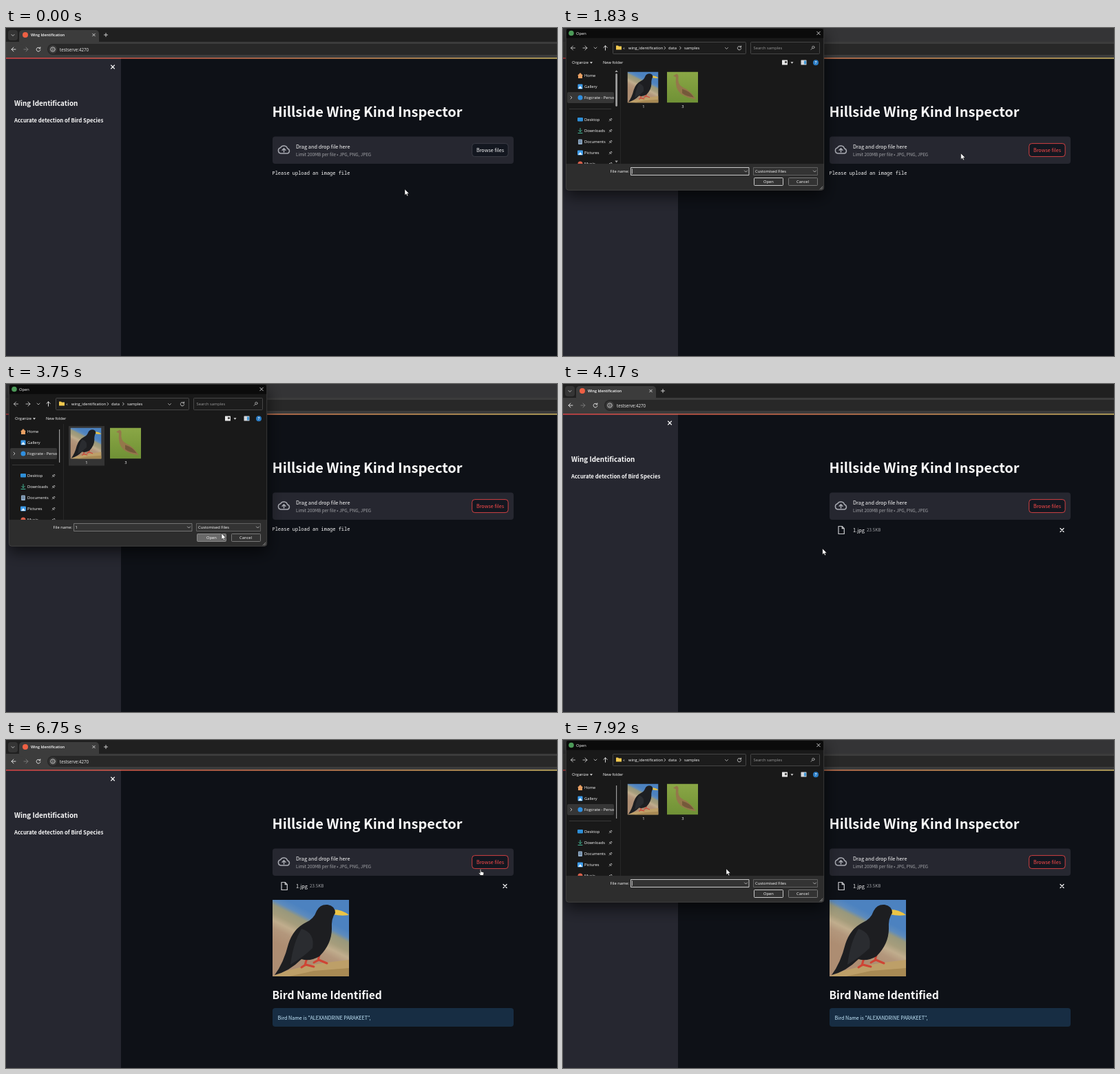
Write an HTML page with a canvas that moves like this. It is 800 px wide and 476 px high and loops after 8 s.

```html
<!DOCTYPE html>
<html lang="en">
<head>
<meta charset="utf-8">
<title>Wing Identification</title>
<style>
html, body { margin: 0; width: 100%; height: 100%; overflow: hidden; background: #0e1117; }
canvas { display: block; width: 800px; height: 476px; }
</style>
</head>
<body>
<canvas id="stage" width="800" height="476"></canvas>
<script>
const ctx = document.getElementById('stage').getContext('2d');
const LOOP = 8000;
const PAGE = '"Noto Sans CJK JP", "Noto Sans CJK SC", "Noto Sans CJK", Lato, sans-serif';
const UI = '"Open Sans", "Noto Sans", sans-serif';
const MONO = '"Noto Sans Mono", monospace';
const RED = '#ff4b4b', WHITE = '#fafafa';

// Dialog and page events, in ms
const OPEN = 1800, PICK = 2660, CLOSE = 3860, FILE = 4040, PHOTO = 4200, RESULT = 6240, REOPEN = 7800;

// Cursor path: time, x, y of the tip
const PATH = [
  [0, 579, 234], [80, 579, 234], [670, 703, 175], [1120, 703, 175], [1670, 621, 187],
  [1920, 560, 180], [2340, 140, 110], [2420, 137, 108], [2830, 137, 108], [3540, 312, 216],
  [3750, 313, 217], [3920, 313, 217], [4600, 520, 288], [5080, 533, 294], [6200, 533, 294],
  [6670, 689, 187], [7050, 689, 187], [7750, 255, 187], [7920, 237, 187], [8000, 237, 187]
];

function rect(x, y, w, h, fill, r = 0, stroke, lw = 1) {
  ctx.beginPath();
  ctx.roundRect(x, y, w, h, r);
  if (fill) { ctx.fillStyle = fill; ctx.fill(); }
  if (stroke) { ctx.strokeStyle = stroke; ctx.lineWidth = lw; ctx.stroke(); }
}

function disc(x, y, r, fill) {
  ctx.beginPath();
  ctx.arc(x, y, r, 0, 7);
  ctx.fillStyle = fill;
  ctx.fill();
}

// An SVG path placed at x, y
function shape(d, x, y, fill, stroke, lw = 1) {
  ctx.save();
  ctx.translate(x, y);
  const p = new Path2D(d);
  if (fill) { ctx.fillStyle = fill; ctx.fill(p); }
  if (stroke) {
    ctx.strokeStyle = stroke;
    ctx.lineWidth = lw;
    ctx.lineJoin = ctx.lineCap = 'round';
    ctx.stroke(p);
  }
  ctx.restore();
}

const line = (d, x, y, color, lw) => shape(d, x, y, null, color, lw);

// Stops are [offset, color] pairs
function gradient(x0, y0, x1, y1, stops) {
  const g = ctx.createLinearGradient(x0, y0, x1, y1);
  stops.forEach(([offset, color]) => g.addColorStop(offset, color));
  return g;
}

// y is the middle of the capitals
function text(str, x, y, size, color = WHITE, weight = 400, font = PAGE, align = 'left') {
  ctx.font = `${weight} ${size}px ${font}`;
  ctx.fillStyle = color;
  ctx.textAlign = align;
  ctx.fillText(str, x, y + size * 0.365);
}

const label = (str, x, y, color = '#fff', align) => text(str, x, y, 5.75, color, 400, UI, align);
const cross = (x, y, r, color, lw) => line(`M${-r} ${-r}L${r} ${r}M${r} ${-r}L${-r} ${r}`, x, y, color, lw);
const chevron = (x, y, color = '#ccc') => line('M-2-1L0 1L2-1', x, y, color, 0.8);

function clipped(x, y, w, h, draw) {
  ctx.save();
  ctx.beginPath();
  ctx.rect(x, y, w, h);
  ctx.clip();
  draw();
  ctx.restore();
}

function blackBird(x, y, size) {
  clipped(x, y, size, size, () => {
    ctx.translate(x, y);
    ctx.scale(size / 111, size / 111);
    rect(0, 0, 111, 111, gradient(4, -8, -24, 48, [
      [0, '#4c82c0'], [0.14, '#5d8bbd'], [0.24, '#98987c'], [0.42, '#a69d7c'],
      [0.56, '#c0ad8d'], [0.72, '#b3977c'], [1, '#ad8d72']
    ]));
    shape('M0 111L20 103L48 96L78 91L111 87V111Z', 0, 0, '#bd9f68');
    shape('M24 111L60 103L111 99V111Z', 0, 0, '#a88a54');
    shape('M88 14Q101 14 111 22Q99 24 88 21Z', 0, 0, '#ecc445');
    line('M50 84L47 95M42 98L48 94L60 97M68 80L66 88M60 91L67 87L79 92', 0, 0, '#cf4434', 3);
    shape('M64 16Q69 6 80 7Q91 9 91 19Q85 27 86 42Q86 64 68 82Q54 90 42 86Q24 104 3 109Q16 92 23 64Q30 42 48 33Q60 28 64 16Z', 0, 0, '#1d1e21');
    shape('M42 42Q62 48 58 70Q46 82 26 94Q30 62 42 42Z', 0, 0, '#2a2c30');
  });
}

function brownBird(x, y) {
  clipped(x, y, 45, 45, () => {
    rect(x, y, 45, 45, gradient(x, y, x, y + 45, [[0, '#8aa746'], [0.5, '#7d9c3d'], [1, '#6f9136']]));
    shape('M9 6L14 3Q17 4 16.5 8Q15 18 22 22Q34 27 42 40Q28 38 20 32Q11 24 13 8Z', x, y, '#94774a');
    shape('M22 25Q33 28 39 37Q28 36 22 31Z', x, y, '#75593a');
  });
}

function browserBar(active) {
  rect(0, 0, 800, 43, '#3c3c3c');
  rect(0, 0, 800, 20, active ? '#202020' : '#343436');
  rect(3, 3, 14, 15, active ? '#353535' : '#3e3e40', 4);
  chevron(10, 10.5, '#ddd');
  rect(19, 3, 116, 22, '#3c3c3c', 5);
  disc(28, 10, 4, '#ee6044');
  text('Wing Identification', 36, 10.3, 5.4, '#fff', 600, UI);
  cross(127.5, 10, 1.8, '#ddd', 0.9);
  line('M-2.5 0H2.5M0-2.5V2.5', 145, 10, '#ddd', 0.9);
  line('M3 0H-3M0-3L-3 0L0 3', 11, 31, '#ddd', 1);
  line('M-3 0H3M0-3L3 0L0 3', 29, 31, '#777', 1);
  line('M2.4-1.6A2.9 2.9 0 1 0 2.9 0.8M2.8-3.2V-1.2H.8', 47, 31, '#ddd', 1);
  rect(60, 23, 760, 16, '#282828', 8);
  disc(68, 31, 6, '#3c3c3c');
  line('M3.2 0A3.2 3.2 0 1 1-3.2 0A3.2 3.2 0 1 1 3.2 0M0-.3V1.5M0-1.6V-1.5', 68, 31, '#ddd', 0.8);
  text('testserve:4270', 78, 31.3, 6.2, '#eee', 400, UI);
}

function page(s) {
  rect(0, 0, 800, 476, '#0e1117');
  rect(0, 43, 167, 433, '#262730');
  browserBar(!s.dialog);
  rect(0, 43.2, 800, 1.3, gradient(0, 0, 957, 0, [[0, RED], [1, '#fffd80']]));

  cross(155, 56.5, 2.5, WHITE, 1.1);
  text('Wing Identification', 12, 109, 9.9, WHITE, 600);
  text('Accurate detection of Bird Species', 12, 134, 7.75, WHITE, 700);
  text('Hillside Wing Kind Inspector', 386.5, 122, 20, WHITE, 700);

  rect(387, 157.5, 350, 39.5, '#262730', 4);
  line('M-4.5 5.5A4.2 4.2 0 0 1-5-2.7A5.6 5.6 0 0 1 5.2-1.5A3.6 3.6 0 0 1 5.2 5.5ZM0 3.6V-1.5M-2.4.8L0-1.7L2.4.8', 403.5, 176.5, '#a9abb2', 1.5);
  text('Drag and drop file here', 421, 171.8, 7.4);
  text('Limit 200MB per file • JPG, PNG, JPEG', 421, 184.2, 6.3, '#a5a6aa');
  rect(676.7, 167.6, 52.4, 19, '#131720', 4, s.hot ? RED : '#42454d', 0.8);
  text('Browse files', 703, 177.2, 7.2, s.hot ? RED : WHITE, 400, PAGE, 'center');

  if (!s.file) {
    text('Please upload an image file', 386.5, 210.5, 6.97, WHITE, 400, MONO);
    return;
  }
  line('M-4-5.5H1.2L4.3-2.4V5.5H-4ZM1.2-5.5V-2.4H4.3', 404, 212, '#c9cacd', 1.2);
  text('1.jpg', 421, 212, 7.3);
  text('23.5KB', 441, 212.2, 6.27, '#a0a2a6');
  cross(724.5, 212, 2.5, WHITE, 1.2);
  if (!s.photo) return;
  blackBird(387, 232, 111);
  text('Bird Name Identified', 386.5, 370, 15.6, WHITE, 600);
  if (s.zoom) {
    rect(741, 228.5, 20, 20, '#1a1c24', 10);
    line('M-3-.6V-3H-.6M-3-3L-.7-.7M3 .6V3H.6M3 3L.7.7', 751, 238.5, '#c8c9cc', 1);
  }
  if (s.result) {
    rect(387, 389, 350, 27, '#172d43', 4);
    text('Bird Name is "ALEXANDRINE PARAKEET",', 394.5, 403, 7.2, '#c7ebff');
  }
}

function sideList(wideBar) {
  rect(6, 93, 68, 16, '#363636', 2);
  shape('M-4 0L0-4L4 0H3V4H-3V0Z', 25, 69, '#e9a063');
  rect(21.5, 81.5, 7, 7, '#3d9be9', 1);
  shape('M-3 3L0-1L3 3Z', 25, 85, '#e8f4ff');
  disc(25, 101, 3.5, '#2f8fe0');
  line('M-1-2L1 0L-1 2', 12, 101, '#ddd', 0.8);
  rect(9, 117, 61, 0.7, '#454545');
  rect(21, 130, 8, 5.5, '#2e8fd8', 1);
  line('M0-3.5V1.5M-2.2-.6L0 1.6L2.2-.6M-3 3.5H3', 25, 149, '#45b795', 1);
  rect(22, 161.5, 6, 7.5, '#8fa9c4', 1);
  line('M-1.6-1.2H1.6M-1.6 1H1.6', 25, 165, '#40566e', 0.7);
  rect(21, 177.5, 8, 7, '#3d9be9', 1);
  shape('M-3 3L0-1L3 3Z', 25, 181, '#e8f4ff');
  label('Home', 31, 69);
  label('Gallery', 31, 85);
  clipped(30, 93, 44, 16, () => label('Fogcrate - Personal', 31, 101));
  ['Desktop', 'Downloads', 'Documents', 'Pictures', 'Music'].forEach((name, i) => {
    const y = 133 + 16 * i;
    clipped(0, 125, 83, 72, () => {
      label(name, 31, y);
      line('M-2 2L-.4.4M-1.6-.6L.8 1.8M-.5-.4L1-2L2.2-.7L.6.8Z', 69, y, '#bbb', 0.8);
      if (i === 4) disc(25, y, 3.5, '#d9604b');
    });
  });
  rect(83, 58, 0.7, 139, '#2e2e2e');
  if (wideBar) {
    rect(76.2, 66, 2.8, 48, '#9c9c9c', 1.4);
    shape('M-2.2 1.3H2.2L0-1.7Z', 77.6, 62.7, '#9c9c9c');
    shape('M-2.2-1.3H2.2L0 1.7Z', 77.6, 193.7, '#9c9c9c');
  } else rect(77, 66, 1.2, 48, '#9c9c9c');
}

function dialog(s) {
  ctx.save();
  ctx.shadowColor = 'rgba(0,0,0,.65)';
  ctx.shadowBlur = 22;
  ctx.shadowOffsetY = 8;
  rect(4, 0, 375, 235.5, '#191919', 4);
  ctx.restore();
  rect(4, 0, 375, 14.5, '#0b0b0b', [4, 4, 0, 0]);
  disc(12, 7.5, 3.8, '#4c9a58');
  label('Open', 19, 7.8);
  cross(371, 7.5, 2.3, '#eee', 0.8);

  line('M3 0H-3M0-3L-3 0L0 3', 14.5, 29, '#ddd', 0.8);
  line('M-3 0H3M0-3L3 0L0 3', 32, 29, '#ddd', 0.8);
  chevron(47, 29);
  line('M0 3.2V-3.2M-2.6-.6L0-3.2L2.6-.6', 61.5, 29, '#eee', 0.9);
  rect(72.5, 20.5, 193, 17, '#1c1c1c', 1, '#515151', 0.8);
  shape('M-4-3H-1L0-2H4V3H-4Z', 81, 28.5, '#f2c94f');
  label('«', 87, 28.5, '#ccc');
  label('wing_identification', 95, 29);
  label('data', 153, 29);
  label('samples', 176, 29);
  for (const x of [148, 170.5]) line('M-1-1.8L.9 0L-1 1.8', x, 29, '#ddd', 0.8);
  chevron(237.5, 29.5);
  line('M2.2-1.5A2.7 2.7 0 1 0 2.7.8M2.6-3V-1.1H.8', 256, 29, '#ddd', 0.8);
  rect(272.5, 20.5, 100, 17, '#1c1c1c', 1, '#515151', 0.8);
  label('Search samples', 276.5, 29, '#9a9a9a');
  line('M2.6-1A1.7 1.7 0 1 1-.8-1A1.7 1.7 0 1 1 2.6-1M-.4.3L-2.4 2.4', 362.5, 29, '#bbb', 0.8);

  label('Organize', 13, 50);
  shape('M-2-1H2L0 1.4Z', 41, 50.3, '#ddd');
  label('New folder', 58, 50);
  rect(318, 46.5, 8, 7, '#e8e8e8', 0.5);
  rect(322, 48, 3, 3, '#555');
  shape('M-2-1H2L0 1.4Z', 332.5, 50.3, '#ddd');
  rect(345.5, 46.5, 8, 7, '#d5d8dc', 0.5);
  rect(350, 47.5, 3, 5, '#4299d7');
  disc(367, 50.2, 4, '#2b7cc4');
  text('?', 367, 50.2, 5.5, '#fff', 700, UI, 'center');

  sideList(s.wideBar);

  if (s.over || s.picked) rect(91, 61, 52, 57.5, s.over ? '#4d4d4d' : '#343434');
  blackBird(93.5, 63.5, 45);
  brownBird(151, 63.5);
  label('1', 117, 114, undefined, 'center');
  label('3', 174, 114, undefined, 'center');

  rect(4, 197, 375, 38.5, '#2d2d2d', [0, 0, 4, 4]);
  label('File name:', 96, 207.8, undefined, 'right');
  rect(98.5, 202.5, 171.5, 11, '#333', 0, s.picked ? '#858585' : '#f0f0f0', 0.8);
  if (s.picked) label('1', 100.5, 208);
  else rect(100.3, 204.2, 0.7, 7.5, '#eee');
  chevron(265.5, 208);
  rect(276.5, 202.5, 93, 11, '#333', 0, '#6c6c6c', 0.8);
  label('Customised Files', 279, 207.8);
  chevron(365.5, 208);
  rect(277.5, 217.5, 42, 11, s.openHot ? '#696969' : '#333', 1, s.openHot ? '#999' : '#f0f0f0', 0.8);
  label('Open', 298.3, 223, undefined, 'center');
  rect(327.5, 217.5, 42, 11, '#333', 1, '#8a8a8a', 0.8);
  label('Cancel', 348, 223, undefined, 'center');
  line('M0 4L4 0M2 4L4 2', 373, 230, '#999', 0.8);
  rect(4.3, 0.3, 374.4, 235, null, 4, '#484848', 0.7);
}

function cursorAt(t) {
  const i = PATH.findIndex(p => p[0] > t);
  const [t0, x0, y0] = PATH[i - 1], [t1, x1, y1] = PATH[i];
  const u = (t - t0) / (t1 - t0), e = u * u * (3 - 2 * u);
  return { x: x0 + (x1 - x0) * e, y: y0 + (y1 - y0) * e };
}

function drawCursor({ x, y }, hand) {
  if (hand) shape('M-.8.7Q0-.3.8.7V4L4 4.8Q5 5.2 4.8 6.2L4.2 9.5H0L-2.7 6.2Q-2.6 5.2-1.6 5.6L-.8 6.2Z', x, y, '#fff', '#111', 0.7);
  else shape('M0 0V8.6L2 6.8L3.4 9.8L4.8 9.2L3.5 6.3H6.1Z', x, y, '#fff', '#111', 0.5);
}

function draw(t) {
  const c = cursorAt(t);
  const within = (a, b) => t >= a && t < b;
  const onButton = c.x > 676 && c.x < 730 && c.y > 166 && c.y < 190;
  const firstDialog = within(OPEN, CLOSE);
  const s = {
    dialog: firstDialog || t >= REOPEN,
    hot: t > 1000 || onButton,
    file: t >= FILE,
    photo: t >= PHOTO,
    zoom: t >= PHOTO && c.y > 231 && c.x > 387 && c.x < 737,
    result: t >= RESULT,
    wideBar: within(OPEN, 2900),
    picked: within(PICK, CLOSE),
    over: firstDialog && c.x > 91 && c.x < 143 && c.y < 118,
    openHot: firstDialog && c.x > 277 && c.x < 320 && c.y > 213
  };
  page(s);
  if (s.dialog) dialog(s);
  drawCursor(c, onButton && !s.dialog);
}

function tick(now) {
  draw(now % LOOP);
  requestAnimationFrame(tick);
}
requestAnimationFrame(tick);
</script>
</body>
</html>
```
